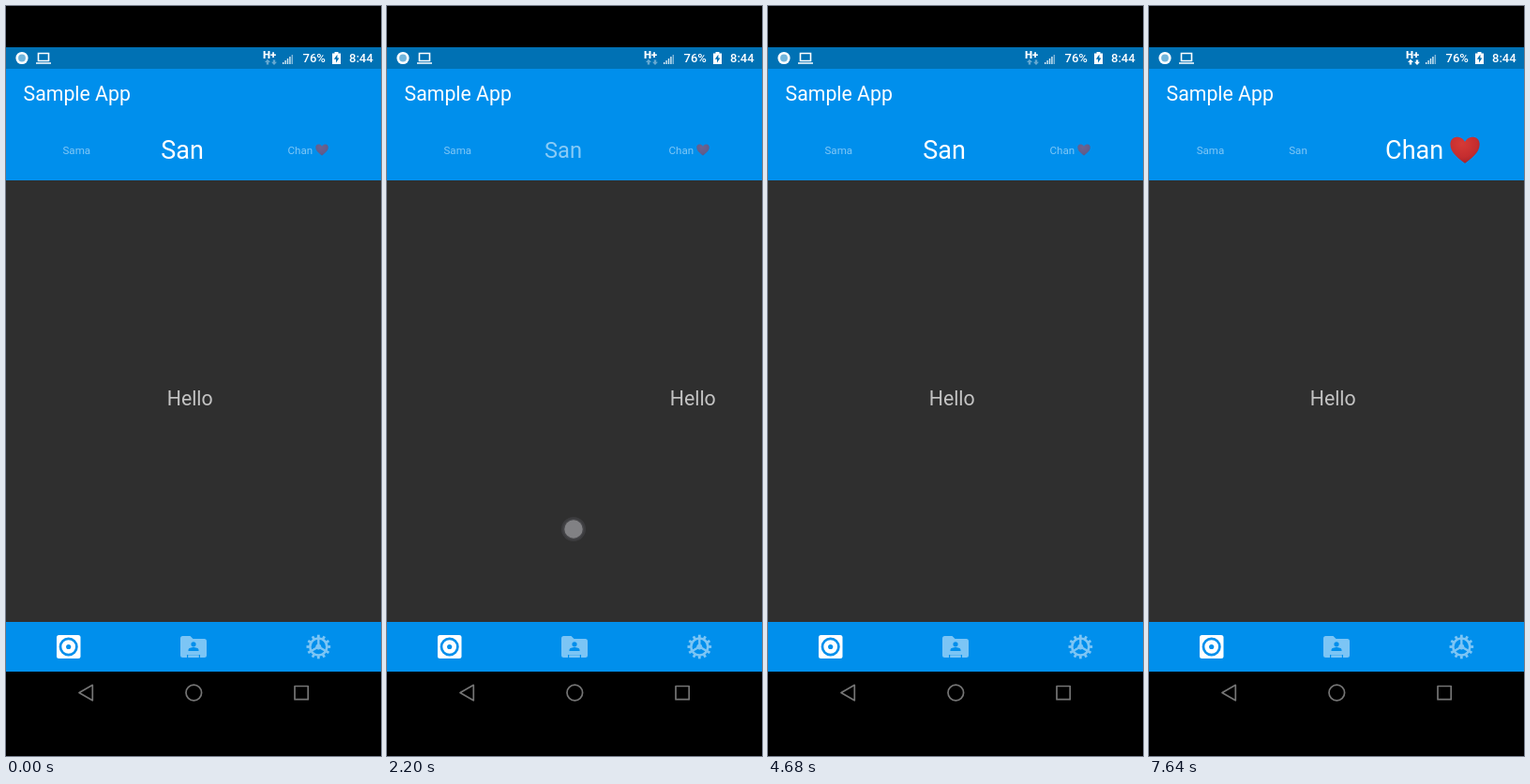
Recreate the animation shown at these times as an HTML page. Size 400x800 px, loop 8.48 s.

```html
<!DOCTYPE html>
<html lang="en">
<head>
<meta charset="utf-8">
<title>Sample App</title>
<style>
  html, body { margin: 0; width: 100%; height: 100%; overflow: hidden; background: #000; }
  svg { display: block; width: 100%; height: 100%; }
  text { font-family: Roboto, sans-serif; fill: #fff; }
  .status { font-size: 13px; font-weight: 500; }
  .title { font-size: 21.3px; }
  .hello { font-size: 21.3px; fill: #c3c3c3; text-anchor: middle; }
</style>
</head>
<body>
<svg viewBox="0 0 400 800">
  <defs>
    <radialGradient id="red" cx=".4" cy=".25" r=".85">
      <stop offset="0" stop-color="#d63a36"/>
      <stop offset=".6" stop-color="#c52d2f"/>
      <stop offset="1" stop-color="#9f2029"/>
    </radialGradient>
  </defs>
  <rect width="400" height="800"/>
  <rect y="186" width="400" height="471" fill="#2f2f2f"/>
  <g id="pages"></g>
  <rect y="44" width="400" height="23" fill="#0071b4"/>
  <rect y="67" width="400" height="119" fill="#008fec"/>
  <rect y="657" width="400" height="53" fill="#008fec"/>

  <!-- status bar -->
  <circle cx="17" cy="55.5" r="6.6" fill="#fff"/>
  <circle cx="17" cy="55.5" r="3.9" fill="#72b6dc"/>
  <path d="M34.5 50.5h11v8h-11zM32 61h16" fill="none" stroke="#fff" stroke-width="1.6"/>
  <text x="274" y="56" font-size="11.5" font-weight="900">H+</text>
  <path id="arrows" fill="#fff" d="M279 56.8l3 3.2h-1.8v2.4h-2.4v-2.4h-1.8zM286 63l-3-3.2h1.8v-2.4h2.4v2.4h1.8z"/>
  <g id="signal" fill="#fff"></g>
  <text class="status" x="316.5" y="60">76%</text>
  <path d="M350.5 49h4v1.5h2.5v11.5h-9v-11.5h2.5z" fill="#fff"/>
  <path d="M353.4 51.8l-3.6 5h2.2v3.6l3.4-5h-2z" fill="#0071b4"/>
  <text class="status" x="366" y="60">8:44</text>

  <text class="title" x="18.5" y="101">Sample App</text>
  <g id="tabs"></g>

  <!-- bottom bar -->
  <rect x="54" y="671" width="25.5" height="25" rx="2.5" fill="#fff"/>
  <circle cx="66.7" cy="683.5" r="8.7" fill="none" stroke="#008fec" stroke-width="2.7"/>
  <circle cx="66.7" cy="683.5" r="2.6" fill="#008fec"/>
  <g fill="#7cc5f5">
    <path d="M188.5 672h8l3 3h12a2.5 2.5 0 0 1 2.5 2.5v15a2.5 2.5 0 0 1-2.5 2.5h-4.5v-2.5h-14v2.5h-4.500a2.500 2.500 0 0 1-2.500-2.500v-18a2.500 2.500 0 0 1 2.500-2.500z"/>
    <rect x="194" y="692.500" width="12" height="2.500"/>
    <path d="M193 692h1.200v3h-1.200zM205.800 692h1.200v3h-1.200z" fill="#008fec"/>
    <g fill="#008fec">
      <circle cx="200" cy="680.800" r="2.600"/>
      <path d="M194.500 688v-1c0-2 3.500-2.900 5.500-2.900s5.500.9 5.500 2.900v1z"/>
    </g>
  </g>
  <g id="gear" transform="translate(333.300 683.500)" fill="none" stroke="#7cc5f5">
    <circle r="9" stroke-width="2.600"/>
    <circle r="2.600" fill="#7cc5f5"/>
  </g>

  <!-- system keys -->
  <g fill="none" stroke="#747474" stroke-width="1.700" stroke-linejoin="round">
    <path d="M78 732.500l14.300-8.200v16.400z"/>
    <circle cx="200.300" cy="732.500" r="8.300"/>
    <rect x="308" y="725.500" width="14.200" height="14.200"/>
  </g>

  <g id="dot">
    <circle r="13" fill="#55555c" opacity=".35"/>
    <circle r="11" fill="#4b4b50" opacity=".7"/>
    <circle r="9.700" fill="#858587" opacity=".95"/>
  </g>
</svg>
<script>
const LOOP = 8480, STEP = 40, WIDTH = 400;
const SMALL = 11.6, BIG = 27, DIM = 0.5;

// Each touch goes down, may drag (x to x2), and is released toward a page.
const touches = [
  { down: 1000, up: 1080, page: 0, lead: 0.35, glide: 600, x: 150, x2: 301, y: 553 },
  { down: 1880, up: 2120, page: 1, lead: 0.335, glide: 600, x: 343, x2: 199, y: 558 },
  { down: 2960, up: 3180, page: 2, lead: 0.44, glide: 600, x: 345, x2: 160, y: 440 },
  { down: 4400, up: 4460, page: 1, lead: 0, glide: 200, x: 159, x2: 159, y: 144 },
  { down: 5240, up: 5380, page: 0, lead: 0, glide: 200, x: 67, x2: 67, y: 144 },
  { down: 6120, up: 6270, page: 2, lead: 0, glide: 300, x: 351, x2: 351, y: 138 },
  { down: 7280, up: 7500, page: 2, lead: 0, glide: 200, x: 355, x2: 355, y: 139 }
];

// Tab centres: normal layout, and the one with the last tab enlarged.
const tabs = [
  { label: "Sama", x: 75.3, shifted: 65.5 },
  { label: "San", x: 188, shifted: 159 },
  { label: "Chan", x: 322.4, shifted: 303, heart: true }
];

const $ = id => document.getElementById(id);
const clamp = v => Math.max(0, Math.min(1, v));
const mix = (a, b, k) => a + (b - a) * k;
const easeOut = (k, power) => 1 - (1 - clamp(k)) ** power;

function add(parent, tag, attrs, text) {
  const el = document.createElementNS(parent.namespaceURI, tag);
  set(el, attrs);
  if (text) el.textContent = text;
  return parent.appendChild(el);
}
function set(el, attrs) {
  for (const key in attrs) el.setAttribute(key, attrs[key]);
}

for (let i = 0; i < 5; i++) {
  const h = 2 + i * 2;
  add($("signal"), "rect", { x: 295 + i * 2.4, y: 62 - h, width: 1.4, height: h, opacity: i < 4 ? 0.85 : 0.5 });
}
for (let i = 0; i < 12; i++) {
  add($("gear"), "path", { d: "M0-9.500V-12.800", "stroke-width": 2.8, transform: `rotate(${i * 30})` });
}
for (let i = 0; i < 3; i++) {
  add($("gear"), "path", { d: "M0 0V-9", "stroke-width": 2.4, transform: `rotate(${i * 120})` });
}

const hellos = tabs.map(() => add($("pages"), "text", { class: "hello", y: 426 }, "Hello"));
for (const tab of tabs) {
  tab.group = add($("tabs"), "g", {});
  tab.text = add(tab.group, "text", tab.heart
    ? { x: -1.885, y: 0.355 }
    : { x: 0, y: 0.355, "text-anchor": "middle" }, tab.label);
  tab.text.style.fontSize = "1px";
  if (tab.heart) {
    add(tab.group, "path", {
      fill: "url(#red)", transform: "translate(1.260 .02)",
      d: "M0-.34C.09-.5.22-.53.32-.53C.49-.53.58-.39.58-.24C.58.1.22.34 0 .51C-.22.34-.58.1-.58-.24C-.58-.39-.49-.53-.32-.53C-.22-.53-.09-.5 0-.34Z"
    });
  }
}

function stateAt(t) {
  let page = 1, selected = 1, grown = 1, dot = null;
  for (const touch of touches) {
    if (t < touch.down) break;
    const from = page, since = t - touch.up;
    const drag = clamp((t - touch.down) / (touch.up - touch.down)) ** 2;
    const moved = since < 0
      ? touch.lead * drag
      : mix(touch.lead, 1, easeOut(since / touch.glide, 5));
    page = mix(from, touch.page, moved);
    if (since >= 0) {
      grown = selected === touch.page ? 1 : clamp(since / 200);
      selected = touch.page;
    }
    dot = { x: mix(touch.x, touch.x2, drag), y: touch.y, alpha: clamp((140 - since) / 60) };
  }
  return { page, selected, grown, dot };
}

function draw(t) {
  const { page, selected, grown, dot } = stateAt(t);
  hellos.forEach((el, i) => set(el, { x: 196.2 + (i - page) * WIDTH }));

  const size = easeOut(grown, 3);
  const shift = selected === 2 ? size : 0;
  tabs.forEach((tab, i) => {
    const on = i === selected;
    const scale = mix(SMALL, BIG, on ? size : 0);
    set(tab.group, {
      transform: `translate(${mix(tab.x, tab.shifted, shift)} 153.400) scale(${scale})`,
      opacity: mix(DIM, 1, on ? grown ** 3 : 0)
    });
  });

  set($("arrows"), { opacity: t < 5840 ? 0.4 : 1 });
  set($("dot"), dot
    ? { transform: `translate(${dot.x} ${dot.y})`, opacity: dot.alpha }
    : { opacity: 0 });
}

const start = performance.now();
function tick() {
  const t = (performance.now() - start) % LOOP;
  draw(t - t % STEP);
  requestAnimationFrame(tick);
}
draw(0);
tick();
</script>
</body>
</html>
```
